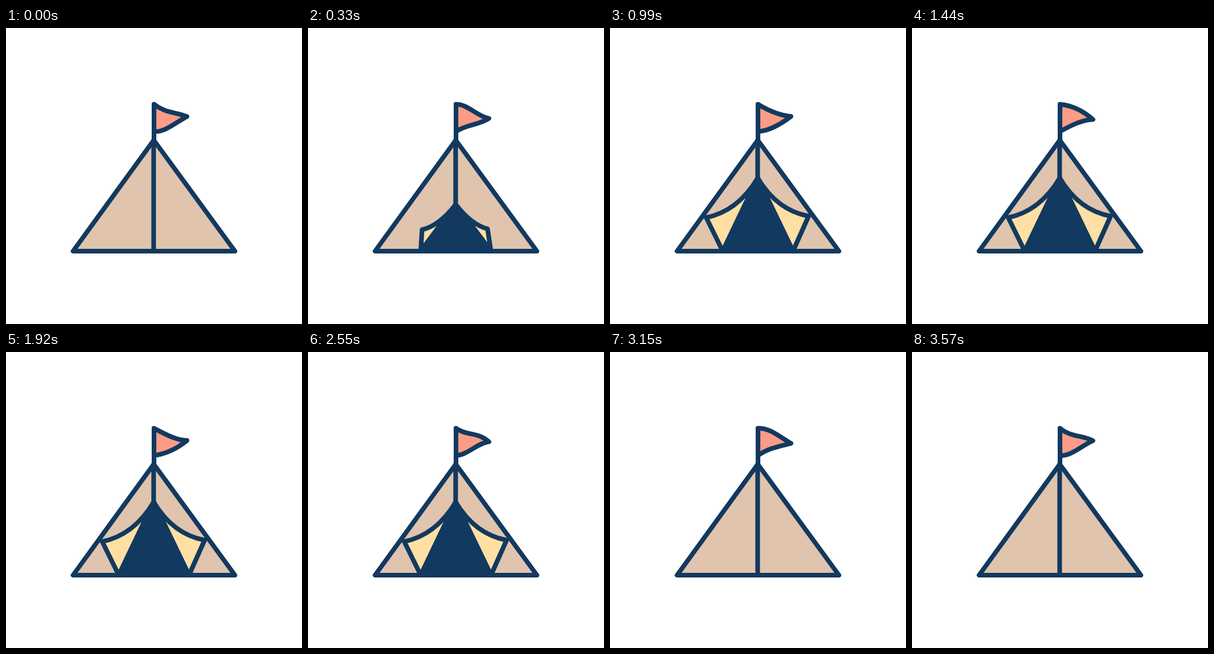
Animation, 512 px wide and 512 px high, one loop 3600 ms. Source, as an HTML page:

```html
<!DOCTYPE html>
<html lang="en">
<head>
<meta charset="utf-8">
<title>Tent</title>
<style>
  html, body { margin: 0; width: 100%; height: 100%; overflow: hidden; background: #fff; }
  svg { display: block; width: 100vw; height: 100vh; }
  path { stroke: #12395f; stroke-width: 8; stroke-linecap: round; stroke-linejoin: round; }
</style>
</head>
<body>
<svg viewBox="0 0 512 512">
  <path id="flag" fill="#fa9c87"/>
  <path fill="none" d="M256 132V194"/>
  <path fill="#e0c4ae" d="M255.6 194L116 386H396Z"/>
  <path fill="none" d="M255.4 194V386"/>
  <path id="left" fill="#ffdfa3"/>
  <path id="right" fill="#ffdfa3"/>
  <path id="door" fill="#12395f"/>
</svg>
<script>
const LOOP = 3600, WAVE = 900, MOVE = 600, CLOSE_AT = 2550;
const MIDDLE = 255.5, BASE = 386;
const get = id => document.getElementById(id);
const flag = get('flag'), left = get('left'), right = get('right'), door = get('door');

const mix = (a, b, k) => a + (b - a) * k;
const mixPoint = (a, b, k) => [mix(a[0], b[0], k), mix(a[1], b[1], k)];
const clamp = v => Math.min(1, Math.max(0, v));
const ease = v => v < 0.5 ? 4 * v ** 3 : 1 - 4 * (1 - v) ** 3;

// Control heights of a cubic that passes through four evenly spaced heights.
const controls = (a, b, c, d) => [
  (-5 * a + 18 * b - 9 * c + 2 * d) / 6,
  (2 * a - 9 * b + 18 * c - 5 * d) / 6
];

function drawFlag(t) {
  const swing = (mean, size, peak) => mean + size * Math.cos(2 * Math.PI * (t / WAVE - peak));
  const tip = swing(155.6, 2.7, 0.57);
  const [t1, t2] = controls(132, swing(139, 3.5, 0.03), swing(146.8, 3.2, 0.21), tip);
  const [b1, b2] = controls(179, swing(172, 3.3, 0.03), swing(163.7, 2.6, 0.19), tip);
  flag.setAttribute('d', `M256 132C275 ${t1} 294 ${t2} 313 ${tip}C294 ${b2} 275 ${b1} 256 179Z`);
}

function drawFlap(path, open, top, corner, closed, opened) {
  const bend = mixPoint(closed.bend, opened.bend, open);
  const tip = mixPoint(closed.tip, opened.tip, open);
  path.setAttribute('d', `M${MIDDLE} ${top}Q${bend} ${tip}L${corner} ${BASE}Z`);
}

function drawDoor(t) {
  const open = ease(clamp(t / MOVE)) - ease(clamp((t - CLOSE_AT) / MOVE));
  const top = mix(BASE, 259.5, open);
  drawFlap(left, open, top, 195,
    { bend: [238, BASE], tip: [252, BASE] }, { bend: [221.5, 316.5], tip: [166.5, 328] });
  drawFlap(right, open, top, 316.5,
    { bend: [274, BASE], tip: [252, BASE] }, { bend: [288.5, 315], tip: [343.5, 325.5] });
  door.setAttribute('d', `M${MIDDLE} ${top}L195 ${BASE}H316.5Z`);
}

function frame() {
  const t = performance.now() % LOOP;
  drawFlag(t);
  drawDoor(t);
  requestAnimationFrame(frame);
}
frame();
</script>
</body>
</html>
```
